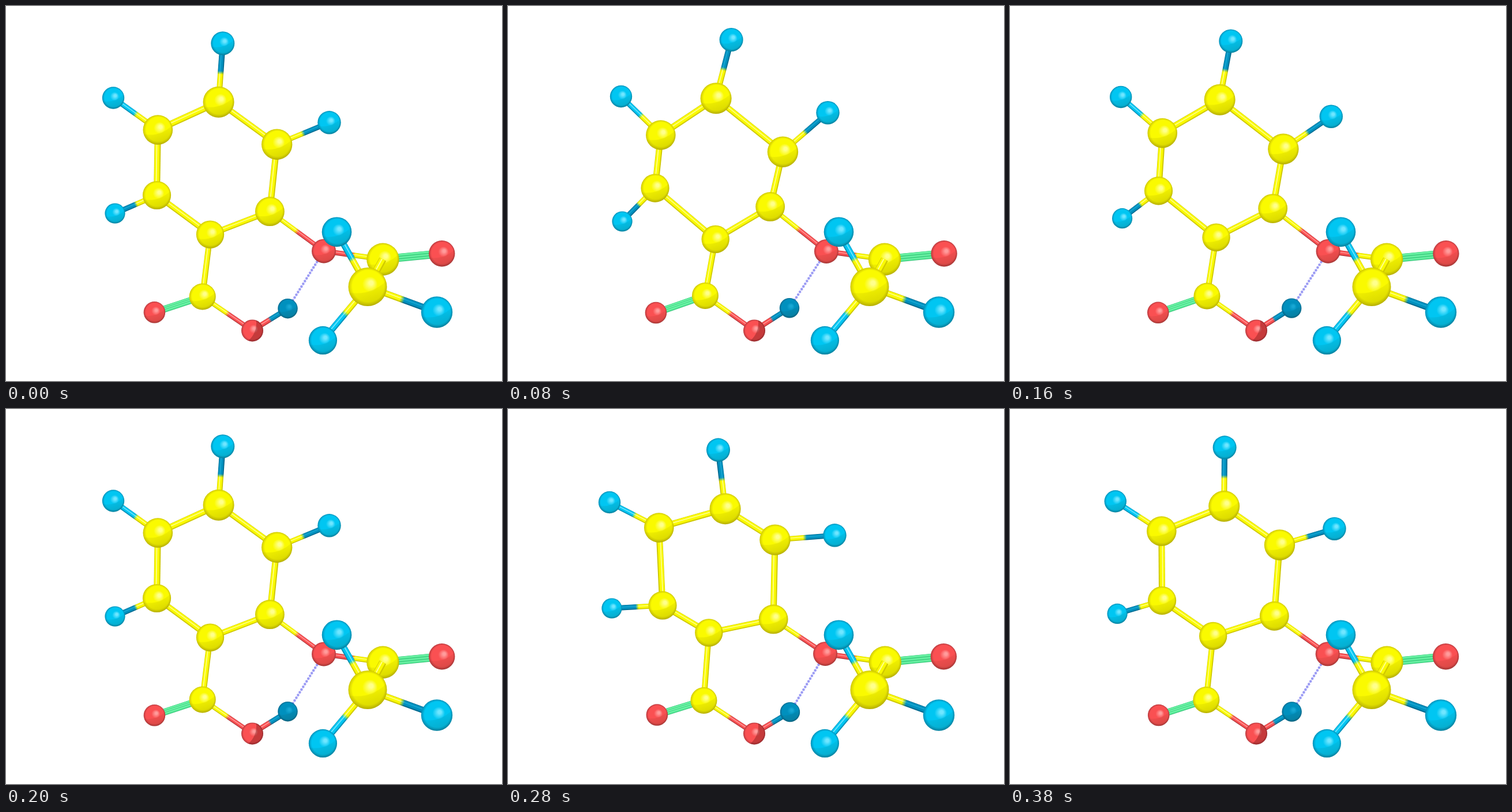
Recreate the animation shown at these times as an HTML page with a canvas. Size 860 by 651 pixels, loop 400 ms.

```html
<!DOCTYPE html>
<html>
<head>
<meta charset="utf-8">
<style>
html, body { margin: 0; width: 100%; height: 100%; overflow: hidden; background: #fff; }
canvas { display: block; }
</style>
</head>
<body>
<canvas id="stage" width="860" height="651"></canvas>
<script>
const ctx = document.getElementById('stage').getContext('2d');
const PERIOD = 400, STEP = 20;

// dark, main and light tone of each material
const tones = {
  C: ['#cfc800', '#fafa00', '#ffff8c'],
  H: ['#0090b8', '#00c6f2', '#70e6ff'],
  S: ['#006a90', '#0090be', '#18a8d4'],
  O: ['#b83a3e', '#fa5052', '#ff9c9c'],
  D: ['#3cc47c', '#52ea94', '#8cf8ba']
};

// material, rest x, rest y, radius, swing x, swing y
const atoms = {
  h1: ['H', 375.8, 64.8, 20.5, 11.9, -6.6],
  h2: ['H', 186, 159.5, 19.2, 10.5, -2.6],
  h3: ['H', 560.5, 202.3, 20.2, -6.3, -17.9],
  h4: ['H', 189, 360, 17.6, 9.5, 14.7],
  c1: ['C', 368.6, 166.7, 27, -8.4, -6.8],
  c2: ['C', 263.3, 215, 25.8, 1.6, 9.5],
  c3: ['C', 469.7, 240.2, 26.7, 7.1, 13.7],
  c4: ['C', 261.5, 328.5, 24.6, -6.8, -13.1],
  c5: ['C', 457.4, 356.7, 25.4, -2.9, -8.7],
  c6: ['C', 354, 396.6, 24.2, 6, 8.7],
  c7: ['C', 340.7, 504.4, 23, 1.3, -1.6],
  o1: ['O', 257.4, 531.8, 18.8, -1, 0.8],
  o2: ['O', 427, 563.4, 19, 0, 0],
  h5: ['S', 488.5, 525.2, 17.2, -0.5, -1],
  o3: ['O', 551, 425.4, 21, 1, 0.5],
  o4: ['O', 755.7, 429.7, 22.7, 0.4, 0],
  c8: ['C', 653.4, 439.7, 28.2, -0.4, 0],
  ha: ['H', 573.5, 392.2, 25.8, 0, 0],
  hb: ['H', 747, 531.5, 27.2, 0, 0],
  hc: ['H', 549.4, 580.4, 24.6, 0, 0],
  c9: ['C', 627, 487.5, 33.5, 0, 0]
};

// ends, width, optional material of the second half
const bonds = [
  ['c1', 'c2', 11], ['c2', 'c4', 11], ['c4', 'c6', 10], ['c6', 'c5', 10],
  ['c5', 'c3', 11], ['c3', 'c1', 10], ['c6', 'c7', 10],
  ['c1', 'h1', 10, 'S'], ['c2', 'h2', 9], ['c3', 'h3', 9, 'S'], ['c4', 'h4', 9, 'S'],
  ['c5', 'o3', 8], ['c7', 'o2', 8], ['o2', 'h5', 9, 'S'], ['c8', 'o3', 9]
];
const frontBonds = [['c9', 'ha', 11], ['c9', 'hb', 11, 'S'], ['c9', 'hc', 11], ['c8', 'c9', 13]];

let pos;

function line(x1, y1, x2, y2, width, style) {
  ctx.beginPath();
  ctx.moveTo(x1, y1);
  ctx.lineTo(x2, y2);
  ctx.lineWidth = width;
  ctx.strokeStyle = style;
  ctx.stroke();
}

// stacked strokes give the rod its round look
function rod(x1, y1, x2, y2, width, from, to, split = 0.5) {
  const length = Math.hypot(x2 - x1, y2 - y1);
  let nx = (y2 - y1) / length, ny = (x1 - x2) / length;
  if (ny > 0) { nx = -nx; ny = -ny; }
  [[1, 0], [0.76, 0.06], [0.16, 0.12]].forEach(([scale, shift], i) => {
    const paint = ctx.createLinearGradient(x1, y1, x2, y2);
    paint.addColorStop(split - 0.03, tones[from][i]);
    paint.addColorStop(split + 0.03, tones[to][i]);
    const dx = nx * width * shift, dy = ny * width * shift;
    line(x1 + dx, y1 + dy, x2 + dx, y2 + dy, width * scale, paint);
  });
}

function bond([a, b, width, end]) {
  rod(...pos[a], ...pos[b], width, atoms[a][0], end || atoms[b][0]);
}

function doubleBond(a, b, gap, width, split) {
  const [x1, y1] = pos[a], [x2, y2] = pos[b];
  const length = Math.hypot(x2 - x1, y2 - y1);
  const nx = (y2 - y1) / length, ny = (x1 - x2) / length;
  for (const k of [-gap, 0, gap])
    rod(x1 + nx * k, y1 + ny * k, x2 + nx * k, y2 + ny * k, width, 'C', 'D', split);
}

function sphere(name) {
  const [material, , , r] = atoms[name], [x, y] = pos[name];
  const [dark, main, light] = tones[material];
  const paint = ctx.createRadialGradient(x + r * 0.2, y - r * 0.22, 0, x, y, r);
  paint.addColorStop(0, light);
  paint.addColorStop(0.1, light);
  paint.addColorStop(0.4, main);
  paint.addColorStop(0.82, main);
  paint.addColorStop(1, dark);
  ctx.beginPath();
  ctx.arc(x, y, r, 0, 7);
  ctx.fillStyle = paint;
  ctx.fill();

  // soft shaded underside
  const tilt = name === 'o2' ? -1.2 : -0.3;
  const shade = ctx.createLinearGradient(0, 0, 0, r);
  shade.addColorStop(0, 'rgba(40,30,0,.04)');
  shade.addColorStop(1, 'rgba(40,30,0,.16)');
  ctx.save();
  ctx.translate(x, y);
  ctx.rotate(tilt);
  ctx.beginPath();
  ctx.arc(0, 0, r, 0, Math.PI);
  ctx.quadraticCurveTo(0, r * 0.5, r, 0);
  ctx.fillStyle = name === 'o2' ? 'rgba(60,0,0,.28)' : shade;
  ctx.fill();
  ctx.restore();
}

function draw(now) {
  const time = Math.floor(now % PERIOD / STEP) * STEP;
  const swing = Math.sin(2 * Math.PI * time / PERIOD);
  pos = {};
  for (const name in atoms) {
    const [, x, y, , dx, dy] = atoms[name];
    pos[name] = [x + dx * swing, y + dy * swing];
  }
  ctx.fillStyle = '#fff';
  ctx.fillRect(0, 0, 860, 651);

  bonds.forEach(bond);
  doubleBond('c7', 'o1', 3.2, 5.5, 0.22);
  doubleBond('c8', 'o4', 4.4, 5.2, 0.2);

  ctx.lineCap = 'round';
  ctx.setLineDash([0, 5.6]);
  line(...pos.o3, ...pos.h5, 4.6, '#9c9cf4');
  ctx.setLineDash([]);
  ctx.lineCap = 'butt';

  const front = ['ha', 'hb', 'hc', 'c9'];
  Object.keys(atoms).filter(name => !front.includes(name)).forEach(sphere);
  frontBonds.forEach(bond);
  front.forEach(sphere);
}

function tick() {
  draw(performance.now());
  requestAnimationFrame(tick);
}
tick();
</script>
</body>
</html>
```
